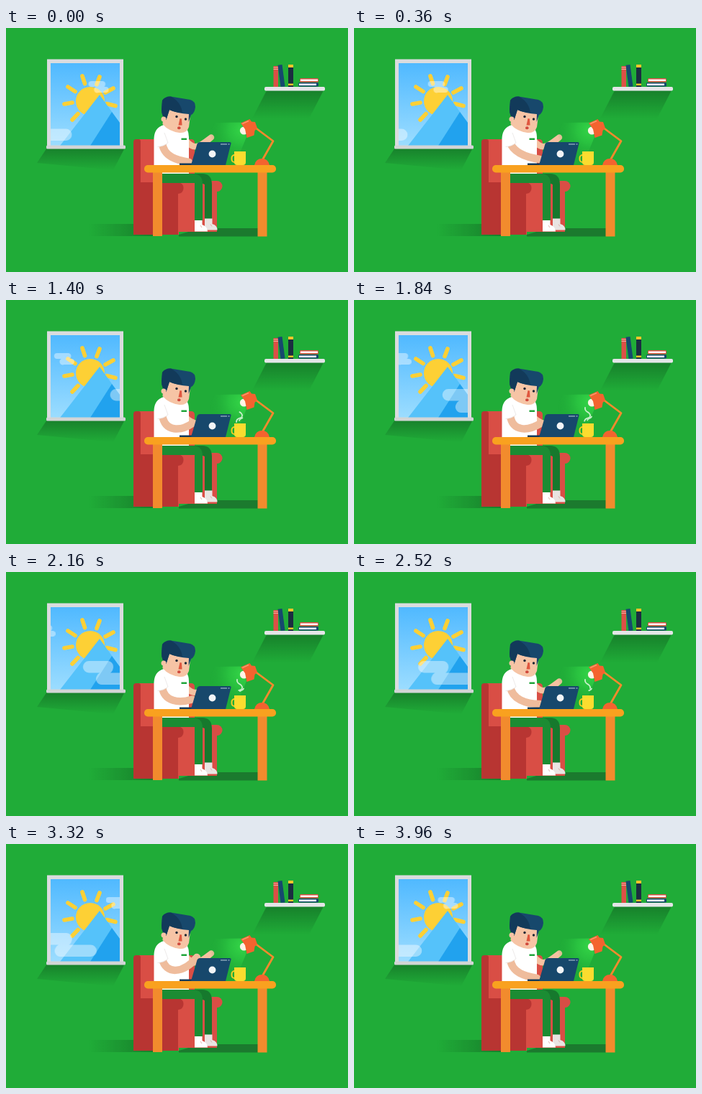
Recreate the animation shown at these times as an HTML page without scripts. Size 475x340 px, loop 4000 ms.

```html
<!DOCTYPE html>
<html lang="en">
<head>
<meta charset="utf-8">
<title>Working by the window</title>
<style>
html, body { margin: 0; width: 100%; height: 100%; overflow: hidden; background: #20ac38; }
svg { display: block; width: 100%; height: 100%; }
.cloud { fill: #fff; opacity: .42; animation: 4s linear infinite; }
.high { animation-name: high; animation-delay: -1.3s; }
.low { animation-name: low; animation-delay: -2.9s; }
@keyframes high { from { transform: translate(160px, 74px); } to { transform: translate(22px, 74px); } }
@keyframes low { from { transform: translate(159.6px, 124px); } to { transform: translate(-38.4px, 124px); } }
.steam path {
  fill: none; stroke: #c9f0cc; stroke-width: 1.8; stroke-linecap: round;
  stroke-dasharray: 1 3; stroke-dashoffset: 1.1;
  animation: rise 4s linear infinite;
}
@keyframes rise {
  0%, 7% { stroke-dashoffset: 1.1; }
  24% { stroke-dashoffset: .62; }
  44% { stroke-dashoffset: 0; }
  63% { stroke-dashoffset: -.45; }
  78%, 100% { stroke-dashoffset: -1.1; }
}
.arm { fill: none; stroke-linecap: round; stroke-linejoin: round; }
</style>
</head>
<body>
<svg viewBox="0 0 475 340" preserveAspectRatio="none">
<defs>
  <linearGradient id="sky" x2="0" y2="1">
    <stop stop-color="#50b9ff"/><stop offset="1" stop-color="#9cddff"/>
  </linearGradient>
  <linearGradient id="fade" x2="0" y2="1">
    <stop stop-color="#17802b"/><stop offset="1" stop-color="#17802b" stop-opacity="0"/>
  </linearGradient>
  <linearGradient id="floor">
    <stop stop-color="#17802b" stop-opacity="0"/><stop offset="1" stop-color="#17802b"/>
  </linearGradient>
  <radialGradient id="glow" gradientUnits="userSpaceOnUse" cx="328" cy="142" r="46">
    <stop stop-color="#35d548"/><stop offset=".4" stop-color="#2cc742" stop-opacity=".8"/>
    <stop offset="1" stop-color="#20ac38" stop-opacity="0"/>
  </radialGradient>
  <clipPath id="glass"><path d="M62 49H158V164H62z"/></clipPath>
</defs>
<path fill="#20ac38" d="M0 0H475V340H0z"/>

<!-- window -->
<path fill="url(#fade)" d="M57 167H165L149 198 43 188z"/>
<path fill="#dadcde" d="M57 43.5H163V165H57z"/>
<g clip-path="url(#glass)">
  <path fill="url(#sky)" d="M62 49H158V164H62z"/>
  <circle cx="117" cy="102" r="20" fill="#fdd035"/>
  <path stroke="#fdd035" stroke-width="5.6" stroke-linecap="round"
    d="M106 67L109.5 77.5M130 68L126 78.5M149 84L138 90M140 105.500L152 108.500M86 82L96 88.500M81 106L92 104M100 119.500L92 128"/>
  <path fill="#55c2fa" d="M75 164L130 93 158 132V164z"/>
  <path fill="#21a2ee" d="M117 164L147 117 158 132V164z"/>
  <g class="cloud high"><path d="M4 0H19A4 4 0 0 1 23.500 4Q23.500 6 22 8H24A4 4 0 0 1 24 16H14A4 4 0 0 1 10 8H4A4 4 0 0 1 4 0z"/></g>
  <g class="cloud low"><path d="M8 0H34A8 8 0 0 1 42 8Q42 13 38 16.500H68A8 8 0 0 1 68 33H26A8 8 0 0 1 19 21Q20 18 23 16.500H8A8 8 0 0 1 8 0z"/></g>
</g>
<rect x="56" y="163.500" width="110" height="5" rx="1.500" fill="#d2d5d6"/>

<!-- shelf -->
<path fill="url(#fade)" d="M362 87H441L421 126H342z"/>
<path fill="#dc5046" d="M371.500 53H378V82H371.500z"/>
<path stroke="#f4b0a6" d="M371.500 55H378M371.500 57.500H378"/>
<path fill="#16486e" d="M377.500 51.800L383.500 51 387.500 81.500 381.500 82z"/>
<path fill="#1b2d40" d="M392 51H399V82H392z"/>
<path fill="#f5c52b" d="M392 51H399V55H392zM392 77.500H399V80H392z"/>
<rect x="408" y="70" width="26" height="5.500" rx="1.500" fill="#dc5046"/>
<path fill="#fff" d="M409 71.500H433V74H409z"/>
<rect x="406" y="76" width="28" height="5.500" rx="1.500" fill="#16486e"/>
<path fill="#fff" d="M407 77.500H431V80H407z"/>
<rect x="359" y="82" width="84" height="5.500" rx="2" fill="#e4e6e8"/>

<!-- floor shadow and chair -->
<path fill="url(#floor)" d="M116 273H204V290H116z"/>
<path fill="#1b7a2e" d="M240 288L270 279H350V290.500H240z"/>
<path fill="#d94e45" d="M182 155H257Q262 155 262 160V216H293V284H240V288H182z"/>
<path fill="#20ac38" d="M262 205H300V216H262z"/>
<rect x="276" y="213" width="24.500" height="15" rx="7.500" fill="#d94e45"/>
<path fill="#b83532" d="M177 159Q177 155 181 155H184Q187 155 187 158V215H239Q246.500 216 246.500 223T239 231V288H177z"/>

<!-- legs -->
<path fill="#16792d" d="M240 203H272Q286 203 286 218V267H276V218z"/>
<path fill="#1b8c33" d="M217 203H259Q273 203 273 217V268H262V216H217z"/>
<path fill="#e9e4e2" d="M276 265.500H286.500V273Q293.500 275 293.500 281.500H276z"/>
<path fill="#fff" d="M262 268H272.500V274Q280 277 280 283.500H262z"/>
<path stroke="#d9a59c" stroke-width=".8" d="M270 275L272 278M284 273.500L286 276.500"/>

<!-- far arm -->
<path class="arm" stroke="#f5c1a1" stroke-width="8.500" d="M250 157C262 172 270 164 285 152.500">
  <animate attributeName="d" dur="4s" repeatCount="indefinite" calcMode="spline"
    keyTimes="0;.09;.24;.46;.63;.83;1"
    keySplines=".4 0 .6 1;.4 0 .6 1;.4 0 .6 1;.4 0 .6 1;.4 0 .6 1;.4 0 .6 1"
    values="M250 157C262 172 270 164 285 152.500;M250 157C262 172 270 164 285 152.500;M250 164C256 170 262 172 272 175;M250 164C256 170 262 172 272 175;M250 157C262 172 270 164 285 152.500;M250 157C262 172 270 164 285 152.500;M250 157C262 172 270 164 285 152.500"/>
</path>

<!-- body -->
<path fill="#fff" d="M219 135H245Q254 140 254 152V203H217V191H205.500V154Q206 139 219 135z"/>
<rect x="243.500" y="153.500" width="7.500" height="2.500" fill="#20a53a"/>

<!-- head -->
<path fill="#f6c4a5" d="M219 114H257L254 138Q251 147 241 146Q226 144 217.500 134z"/>
<path fill="#17486c" d="M217 101Q221 95 229 95.500L256 100Q263 102 263 110Q262 119 257 121L253.500 131 254 120Q238 119 227 114L222.500 128Q216 123 216 114z"/>
<path fill="#123a5a" d="M217 101Q221 95 229 95.500Q243 103 245 118Q235 118 227 114L222.500 128Q216 123 216 114z"/>
<circle cx="219" cy="127" r="3.500" fill="#f6c4a5"/>
<circle cx="237" cy="123.500" r="1.700" fill="#1c2836"/>
<circle cx="249.500" cy="127" r="1.700" fill="#1c2836"/>
<path fill="#e0573f" d="M241.500 126L244 126.500 244.500 135.500H239.500z"/>
<ellipse cx="240.300" cy="139.300" rx="2.300" ry="2" fill="#d0493c"/>

<!-- near arm -->
<path class="arm" stroke="#efbc9c" stroke-width="10.500" d="M217 160C219 180 238 184 254 187">
  <animate attributeName="d" dur="4s" repeatCount="indefinite" calcMode="spline"
    keyTimes="0;.09;.24;.46;.63;.83;.99;1"
    keySplines=".4 0 .6 1;.4 0 .6 1;.4 0 .6 1;.4 0 .6 1;.4 0 .6 1;.4 0 .6 1;0 0 1 1"
    values="M217 160C219 180 238 184 254 187;M217 160C222 173 238 180 258 183;M217 160C222 184 243 184 260 171;M217 160C219 185 243 182 259 172;M217 160C220 177 238 184 258 184;M217 160C222 182 246 181 265 158;M217 160C219 180 238 184 254 187;M217 160C219 180 238 184 254 187"/>
</path>
<path fill="#fff" d="M207 146Q214 139 220 146L225 160Q219 165 210.500 165.500z"/>
<path fill="none" stroke="#e8e4e2" stroke-width=".8" d="M220 146L225 160Q219 165 210.500 165.500"/>

<!-- lamp light, laptop -->
<path fill="url(#glow)" d="M327 131.500L290 132 262 191H318L334 152z"/>
<path fill="#123a5a" d="M241 188.500H304V191H241z"/>
<path fill="#17486c" d="M269 159H310.500Q313 159 312.500 161L305 191H257L265.500 161.500Q266.500 159 269 159z"/>
<path stroke="#7896ac" stroke-width="1.800" d="M298 161.800H307M308.500 161.800H310.500"/>
<circle cx="286.500" cy="175.500" r="4.900" fill="#f2f5f7"/>

<!-- mug -->
<g class="steam">
  <path pathLength="1" d="M320 170C320 162 329 167 328 160C327 155 320 157 321 150"/>
  <path pathLength="1" d="M324 168C325 164 328 166 330 162.500"/>
</g>
<rect x="313.500" y="177" width="8" height="10" rx="4" fill="none" stroke="#f4cd25" stroke-width="2"/>
<path fill="#fbdc2f" d="M317 172H333V187Q333 191 329 191H321Q317 191 317 187z"/>

<!-- lamp -->
<path fill="none" stroke="#f58a2d" stroke-width="2.800" stroke-linejoin="round" d="M345 138L371 157.500 356 184"/>
<circle cx="330.500" cy="143" r="5.600" fill="#fff3e6"/>
<path fill="#f4632f" d="M326 132.500L338.500 127 341 130.500 346 131 349 139.500 345.500 143 344.500 149.500 334.500 153 332 141z"/>
<path stroke="#f99a6c" stroke-width="1.600" d="M328 133.500L337 129.500"/>
<path fill="#f4632f" d="M345 191Q347 182 355.500 182T366 191z"/>

<!-- table -->
<path fill="#f28b2d" d="M204 200H217V290H204zM349.500 200H362.500V290.500H349.500z"/>
<rect x="192" y="191" width="183" height="10.500" rx="5" fill="#f9a11f"/>
</svg>
</body>
</html>
```
